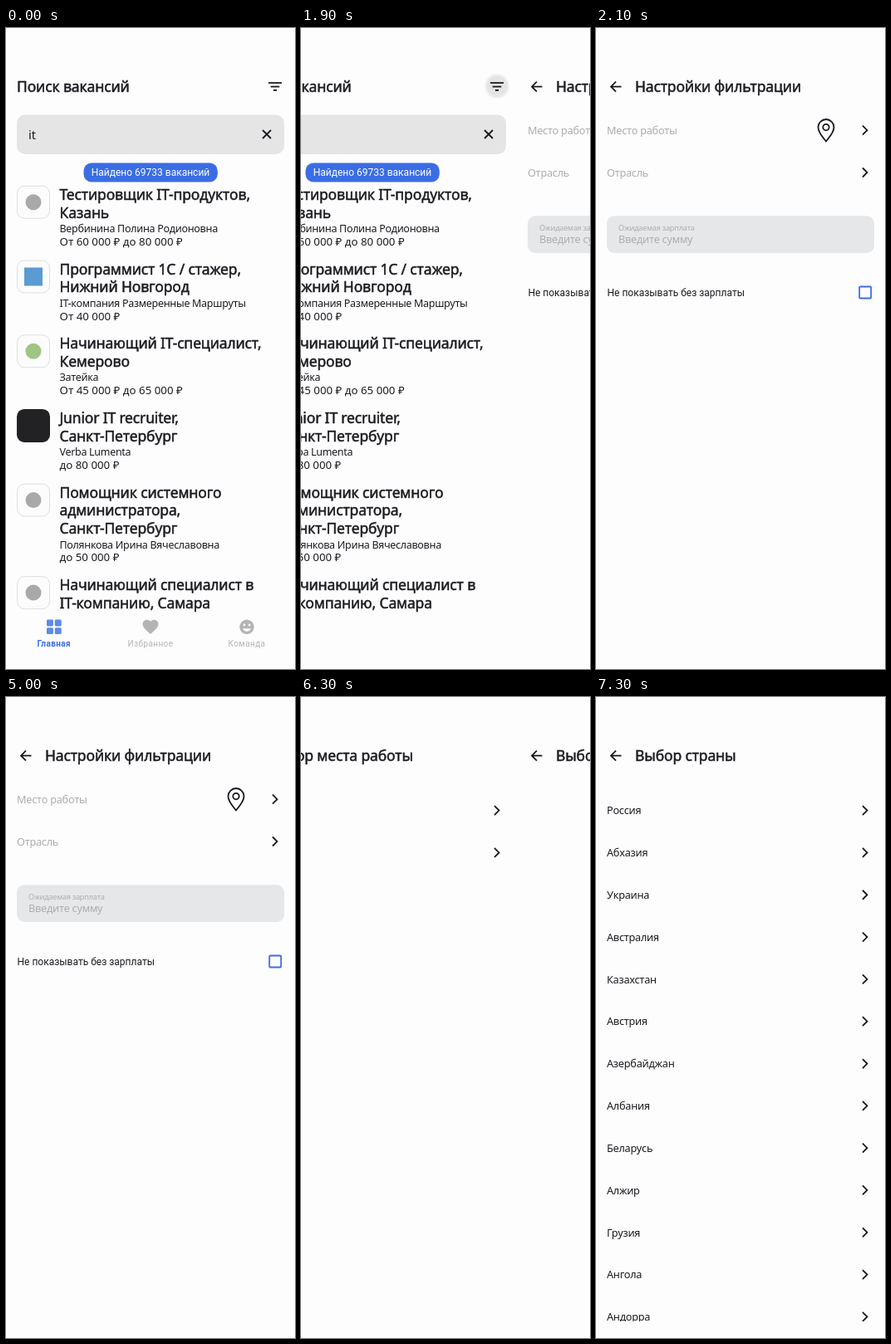
An HTML page for the animation above (8 s loop, 348 by 772 pixels).

```html
<!DOCTYPE html>
<html lang="ru">
<head>
<meta charset="utf-8">
<title>Поиск вакансий</title>
<style>
  html, body { margin: 0; height: 100%; overflow: hidden; background: #fdfdfd; }
  svg { display: block; width: 100%; height: 100%; }
  text { font-family: "Noto Sans", "Open Sans", sans-serif; fill: #1b1c21; white-space: pre; }
  .title { font-size: 17.5px; letter-spacing: -.16px; stroke: #1b1c21; stroke-width: .5px; }
  .body { font-size: 12.7px; letter-spacing: -.25px; }
  .query { font-size: 14.5px; }
  .name { font-size: 12.5px; letter-spacing: -.3px; }
  .pay { font-size: 13.3px; }
  .hint { font-size: 9.2px; letter-spacing: -.25px; }
  .ui { font: 12px Roboto, sans-serif; }
  .tab { font: 10px Roboto, sans-serif; letter-spacing: .4px; text-anchor: middle; }
  .bold { font-weight: 700; }
  .mid { text-anchor: middle; }
  .grey { fill: #adadb1; }
  .off { fill: #b4b4b4; }
  .blue { fill: #3a6de4; }
  .white { fill: #fff; }
  .line { fill: none; stroke: #17181d; stroke-width: 1.8; }
  .edge { stroke: #3a6de4; }
</style>
</head>
<body>
<svg viewBox="0 0 348 772" preserveAspectRatio="none">
  <defs>
    <clipPath id="listArea"><rect y="100" width="348" height="652"/></clipPath>
    <filter id="soft" x="-40%" y="-40%" width="180%" height="180%"><feGaussianBlur stdDeviation="1.8"/></filter>
  </defs>
  <g id="strip"></g>
  <g id="tabs"></g>
</svg>
<script>
const WIDTH = 348, LOOP = 8000, STEP = 100;
const SLIDES = [1800, 5100, 6200], SLIDE_TIME = 298;
const SPINNER_START = 6280, LIST_START = 7100;
const $ = id => document.getElementById(id);

const text = (x, y, cls, s) => `<text x="${x}" y="${y}" class="${cls}">${s}</text>`;
const box = (x, y, w, h, r, attrs) =>
  `<rect x="${x}" y="${y}" width="${w}" height="${h}" rx="${r}" ${attrs}/>`;
const dot = (x, y, r, attrs) => `<circle cx="${x}" cy="${y}" r="${r}" ${attrs}/>`;
const line = (d, attrs = '') => `<path d="${d}" class="line" ${attrs}/>`;
const chevron = y => line(`M321 ${y - 5.5}l5.5 5.5-5.5 5.5`);
const header = s => line('M30.5 70.7H18m6-6-6 6 6 6') + text(47, 77, 'title', s);
const row = (y, s, cls = '') => text(13, y + 4.7, 'body ' + cls, s) + chevron(y);

const vacancies = [
  [['Тестировщик IT-продуктов,', 'Казань'], 'Вербинина Полина Родионовна', 'От 60 000 ₽ до 80 000 ₽', 'robot'],
  [['Программист 1С / стажер,', 'Нижний Новгород'], 'IT-компания Размеренные Маршруты', 'От 40 000 ₽', 'square'],
  [['Начинающий IT-специалист,', 'Кемерово'], 'Затейка', 'От 45 000 ₽ до 65 000 ₽', 'circle'],
  [['Junior IT recruiter,', 'Санкт-Петербург'], 'Verba Lumenta', 'до 80 000 ₽', 'dark'],
  [['Помощник системного', 'администратора,', 'Санкт-Петербург'], 'Полянкова Ирина Вячеславовна', 'до 50 000 ₽', 'robot'],
  [['Начинающий специалист в', 'IT-компанию, Самара'], '', '', 'robot']
];

function tile(y, kind) {
  if (kind === 'dark') return box(13, y, 40, 40, 9, 'fill="#222224"');
  const mark = {
    robot: dot(33, y + 20, 9.5, 'fill="#a9a9a9"'),
    square: box(22, y + 9, 22, 22, 0, 'fill="#5a9bd2"'),
    circle: dot(33, y + 20, 9.5, 'fill="#9fc584"')
  }[kind];
  return box(13.5, y + .5, 39, 39, 9, 'fill="#fcfcfc" stroke="#dedede"') + mark;
}

function vacancyList() {
  let top = 189.8, out = '';
  for (const [lines, name, pay, kind] of vacancies) {
    out += tile(top, kind);
    lines.forEach((s, i) => out += text(64.5, top + 17 + i * 21.8, 'title', s));
    const end = top + 17 + (lines.length - 1) * 21.8;
    out += text(64.5, end + 17.3, 'name', name) + text(64.5, end + 33.2, 'pay', pay);
    top += lines.length * 21.8 + 46.1;
  }
  return out;
}

const home = text(13, 77, 'title', 'Поиск вакансий')
  + `<g id="ripple">${dot(324, 70, 13.8, 'fill="#e4e4e5" filter="url(#soft)"')}</g>`
  + line('M316 66.2h16M318.7 70.6h10.6M322 75h4')
  + box(13, 104.5, 322, 47.5, 10, 'fill="#e5e5e6"')
  + text(27, 133.5, 'query', 'it')
  + line('M309 123l10 10m0-10-10 10')
  + vacancyList()
  + box(93.5, 162.4, 161.3, 23.2, 9.5, 'class="blue"')
  + text(174, 178.3, 'ui mid white', 'Найдено 69733 вакансий');

const filters = header('Настройки фильтрации')
  + row(123.2, 'Место работы', 'grey')
  + line('M277 136.5c-4-5-9.5-10.5-9.5-17a9.5 9.5 0 0 1 19 0c0 6.5-5.5 12-9.5 17z')
  + dot(277, 119.6, 3.7, 'class="line"')
  + row(174, 'Отрасль', 'grey')
  + box(13, 226.3, 322, 44.7, 9, 'fill="#e6e7e9"')
  + text(27, 244, 'hint grey', 'Ожидаемая зарплата')
  + text(27, 259.3, 'body grey', 'Введите сумму')
  + text(13.5, 323, 'ui', 'Не показывать без зарплаты')
  + box(317.2, 311.5, 14, 14, 1, 'class="line edge"');

const place = header('Выбор места работы')
  + row(136.6, 'Страна', 'grey') + row(187.4, 'Регион', 'grey');

const countryNames = 'Россия Абхазия Украина Австралия Казахстан Австрия Азербайджан Албания Беларусь Алжир Грузия Ангола Андорра';
const countries = header('Выбор страны')
  + line('', 'id="spinner" style="stroke:#3a6de4;stroke-width:3.4"')
  + `<g id="list" clip-path="url(#listArea)">${
    countryNames.split(' ').map((s, i) => row(136.6 + i * 50.82, s)).join('')}</g>`;

$('strip').innerHTML = [home, filters, place, countries]
  .map((s, i) => `<g transform="translate(${i * WIDTH})">${s}</g>`).join('');

const HEART = 'M12 21.3 10.5 20C5.4 15.4 2 12.3 2 8.5 2 5.4 4.4 3 7.5 3c1.7 0 3.4.8 4.5 2.1C13.1 3.8 14.8 3 16.5 3 19.6 3 22 5.4 22 8.5c0 3.8-3.4 6.9-8.5 11.5z';
$('tabs').innerHTML =
  [[49, 712.5], [58.8, 712.5], [49, 722.2], [58.8, 722.2]]
    .map(([x, y]) => box(x, y, 7.9, 7.9, 1.3, 'fill="#5c8ae6"')).join('')
  + `<path class="off" transform="translate(162.6 709.8) scale(.95)" d="${HEART}"/>`
  + dot(290, 721.3, 8.7, 'class="off"')
  + dot(286.9, 719, 1.4, 'class="white"') + dot(293.1, 719, 1.4, 'class="white"')
  + '<path class="white" d="M285.2 723.2h9.6a5 5 0 0 1-9.6 0z"/>'
  + text(57.8, 745, 'tab bold blue', 'Главная')
  + text(174, 745, 'tab off', 'Избранное')
  + text(290, 745, 'tab off', 'Команда');

const clamp = x => Math.min(1, Math.max(0, x));
const easeInOut = x => (1 - Math.cos(Math.PI * clamp(x))) / 2;

// cubic-bezier(.4, 0, .2, 1), solved by bisection
function fastOutSlowIn(x) {
  let lo = 0, hi = 1;
  for (let i = 0; i < 16; i++) {
    const u = (lo + hi) / 2, v = 1 - u;
    if (1.2 * v * v * u + .6 * v * u * u + u ** 3 < x) lo = u; else hi = u;
  }
  return lo * lo * (3 - 2 * lo);
}

// Steady rotation while the head runs ahead and the tail catches up
function spinnerPath(time) {
  const spin = time / 5400 * 1520 - 90, grow = 667;
  const cycle = Math.floor(time / 1350), local = time - cycle * 1350;
  const base = spin + cycle * 250;
  const head = base + 250 * fastOutSlowIn(clamp(local / grow));
  const tail = base - 20 + 250 * fastOutSlowIn(clamp((local - grow) / grow));
  const at = deg => {
    const a = deg * Math.PI / 180;
    return `${173.7 + 15.1 * Math.cos(a)} ${424.8 + 15.1 * Math.sin(a)}`;
  };
  return `M${at(tail)}A15.1 15.1 0 ${head - tail > 180 ? 1 : 0} 1 ${at(head)}`;
}

function draw(now) {
  const t = Math.floor(now % LOOP / STEP) * STEP;
  const page = SLIDES.reduce((sum, start) => sum + easeInOut((t - start) / SLIDE_TIME), 0);
  $('strip').setAttribute('transform', `translate(${-page * WIDTH})`);
  $('tabs').style.display = t < SLIDES[0] ? '' : 'none';
  $('ripple').style.display = t < SLIDES[0] ? 'none' : '';
  const list = clamp((t - LIST_START) / 150);
  $('list').style.opacity = list;
  $('spinner').style.display = list ? 'none' : '';
  $('spinner').setAttribute('d', spinnerPath(Math.max(0, t - SPINNER_START)));
}

const origin = performance.now();
function tick() {
  draw(performance.now() - origin);
  requestAnimationFrame(tick);
}
tick();
</script>
</body>
</html>
```
